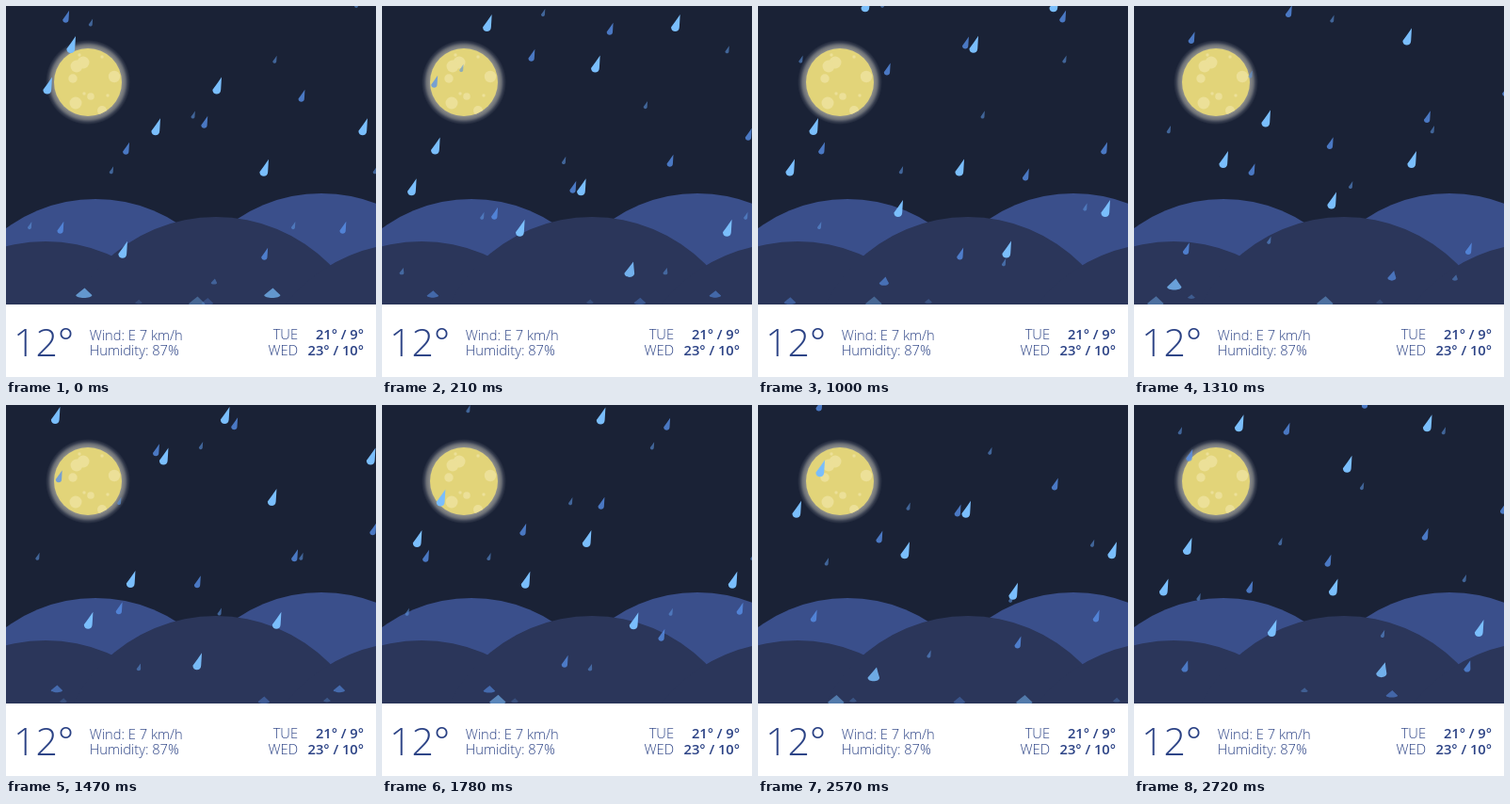
Animation of 393x394 px, one loop 2.8 s. Source, as an HTML page with a canvas:

```html
<!DOCTYPE html>
<html lang="en">
<head>
<meta charset="utf-8">
<title>Night rain</title>
<style>
  html, body { margin: 0; width: 100%; height: 100%; overflow: hidden; background: #fff; }
  canvas, svg { position: absolute; left: 0; top: 0; width: 393px; height: 394px; }
  text { font: 300 14.7px "Open Sans", "Noto Sans", sans-serif; fill: #2b4285; }
  .temp { font-size: 41px; }
  .day, .range { text-anchor: end; }
  .range { font-weight: 600; }
</style>
</head>
<body>
<canvas id="scene" width="393" height="394"></canvas>
<svg viewBox="0 0 393 394">
  <text class="temp" x="8" y="372">12°</text>
  <text x="88.7" y="355">Wind: E 7 km/h</text>
  <text x="88.7" y="371">Humidity: 87%</text>
  <text class="day" x="310" y="354">TUE</text>
  <text class="day" x="310" y="371">WED</text>
  <text class="range" x="380" y="354">21° / 9°</text>
  <text class="range" x="380" y="371">23° / 10°</text>
</svg>
<script>
const W = 393, H = 394, GROUND = 317;
const LOOP = 2800, TRAVEL = 392, TOP = -40;
const ctx = document.getElementById('scene').getContext('2d');

// Time in ms against rain progress, in tenths of a second
const PACE = [[0, 0], [523, 6.15], [992, 11], [1304, 14.8], [1773, 19.32],
  [2242, 23.97], [2719, 29.5]];

// Far to near. A fall lasts `span` tenths of a second. Each stream is an
// arithmetic run of drops: first column, column step, first delay.
const LAYERS = [
  { span: 20, y0: 293, x0: 12, size: .45, color: '#5b93dc', alpha: .6, lag: 3,
    streams: [[2, 4, 3], [4, 4, 14]] },
  { span: 14, y0: 349, x0: 5, size: .72, color: '#5891eb', alpha: .78, lag: -4,
    streams: [[3, 8, 12], [7, 8, 7], [4, 8, 4], [8, 8, 13]] },
  { span: 9, y0: 392, x0: 14, size: 1, color: '#7abefc', alpha: 1, lag: 4,
    streams: [[2, 3, 7], [3, 4, 8]] }
];
const PER_STREAM = 5;

const clamp = v => Math.max(0, Math.min(1, v));
const mix = (a, b, p) => a + (b - a) * p;
const mod = (a, n) => ((a % n) + n) % n;

function disc(c, x, y, r, color) {
  c.fillStyle = color;
  c.beginPath();
  c.arc(x, y, r, 0, 7);
  c.fill();
}

function paintMoon(c, x, y, r) {
  const glow = c.createRadialGradient(x, y, r, x, y, r + 9);
  glow.addColorStop(0, 'rgba(255,250,225,.5)');
  glow.addColorStop(.4, 'rgba(255,250,230,.36)');
  glow.addColorStop(.7, 'rgba(255,255,255,.12)');
  glow.addColorStop(1, 'rgba(255,255,255,0)');
  disc(c, x, y, r + 9, glow);
  disc(c, x, y, r, '#e2d479');

  c.save();
  c.beginPath();
  c.arc(x, y, r, 0, 7);
  c.clip();
  const crater = (dx, dy, size) => disc(c, x + dx, y + dy, size, '#ece098');
  crater(-5, -21, 6.5);
  crater(-12, -17, 6.5);
  crater(-16, -4, 4.7);
  crater(28, -6, 6.2);
  crater(-13, 22, 6.5);
  crater(3, 15, 3.8);
  crater(15, 30, 5);
  for (let i = 0; i < 2; i++) {
    crater(-9 + 24 * i, -29 + 2 * i, 1.7);
    crater(-4 + 25 * i, 12 + 2 * i, 1.7);
  }
  c.restore();
}

function paintBackdrop() {
  const layer = document.createElement('canvas');
  layer.width = W;
  layer.height = H;
  const c = layer.getContext('2d');
  c.fillStyle = '#1a2236';
  c.fillRect(0, 0, W, H);
  paintMoon(c, 87, 81, 36);
  for (const [x, y] of [[95, 366], [335, 360]]) disc(c, x, y, 161, '#3a4f8b');
  for (const [x, y] of [[42, 420], [223, 394], [430, 422]]) disc(c, x, y, 170, '#2b365a');
  return layer;
}

// Teardrop that flattens into a splash as p goes from 0 to 1
function drop(x, y, size, p) {
  const side = mix(4.6, 8.8, p);
  const tipX = mix(5, .5, p), tipY = mix(-11.5, -5.5, p);
  const low = mix(8, 6, p);
  ctx.save();
  ctx.translate(x, y);
  ctx.scale(size, size);
  ctx.beginPath();
  ctx.moveTo(-side, 2);
  ctx.quadraticCurveTo(mix(.3, -4, p), mix(-4.5, -2, p), tipX, tipY);
  ctx.quadraticCurveTo(mix(4.6, 4, p), mix(-4, -2, p), side - .4, 2);
  ctx.bezierCurveTo(side - .4, low, -side, low, -side, 2);
  ctx.fill();
  ctx.restore();
}

// The picture holds between steps; they come faster at both ends of the loop
function held(t) {
  const snap = (from, step) => from + Math.floor((t - from) / step) * step;
  if (t < 210) return snap(0, 70);
  return t < 2555 ? snap(210, 156.3) : snap(2555, 82);
}

function progress(t) {
  let i = 1;
  while (i < PACE.length - 1 && PACE[i][0] < t) i++;
  const [ta, a] = PACE[i - 1], [tb, b] = PACE[i];
  return mix(a, b, (t - ta) / (tb - ta));
}

const backdrop = paintBackdrop();

function render(t) {
  const now = progress(held(t));
  ctx.drawImage(backdrop, 0, 0);
  for (const { span, y0, x0, size, color, alpha, lag, streams } of LAYERS) {
    ctx.fillStyle = color;
    for (const [column, step, delay] of streams) {
      for (let i = 0; i < PER_STREAM; i++) {
        const age = now - delay - lag * i;
        const y = TOP + mod(y0 + TRAVEL / span * age - TOP, TRAVEL);
        const x = x0 + 20 * (column + step * i) - Math.min(.115 * y, 31);
        const shownY = y < 313 ? y : 313 + (y - 313) * .03;
        ctx.globalAlpha = alpha * (1 - .66 * clamp((y - 270) / 80));
        drop(x, shownY, size, clamp((y - 276) / 26));
      }
    }
  }
  ctx.globalAlpha = 1;
  ctx.fillStyle = '#fff';
  ctx.fillRect(0, GROUND, W, H - GROUND);
}

const start = performance.now();
function tick() {
  render((performance.now() - start) % LOOP);
  requestAnimationFrame(tick);
}
tick();
</script>
</body>
</html>
```
